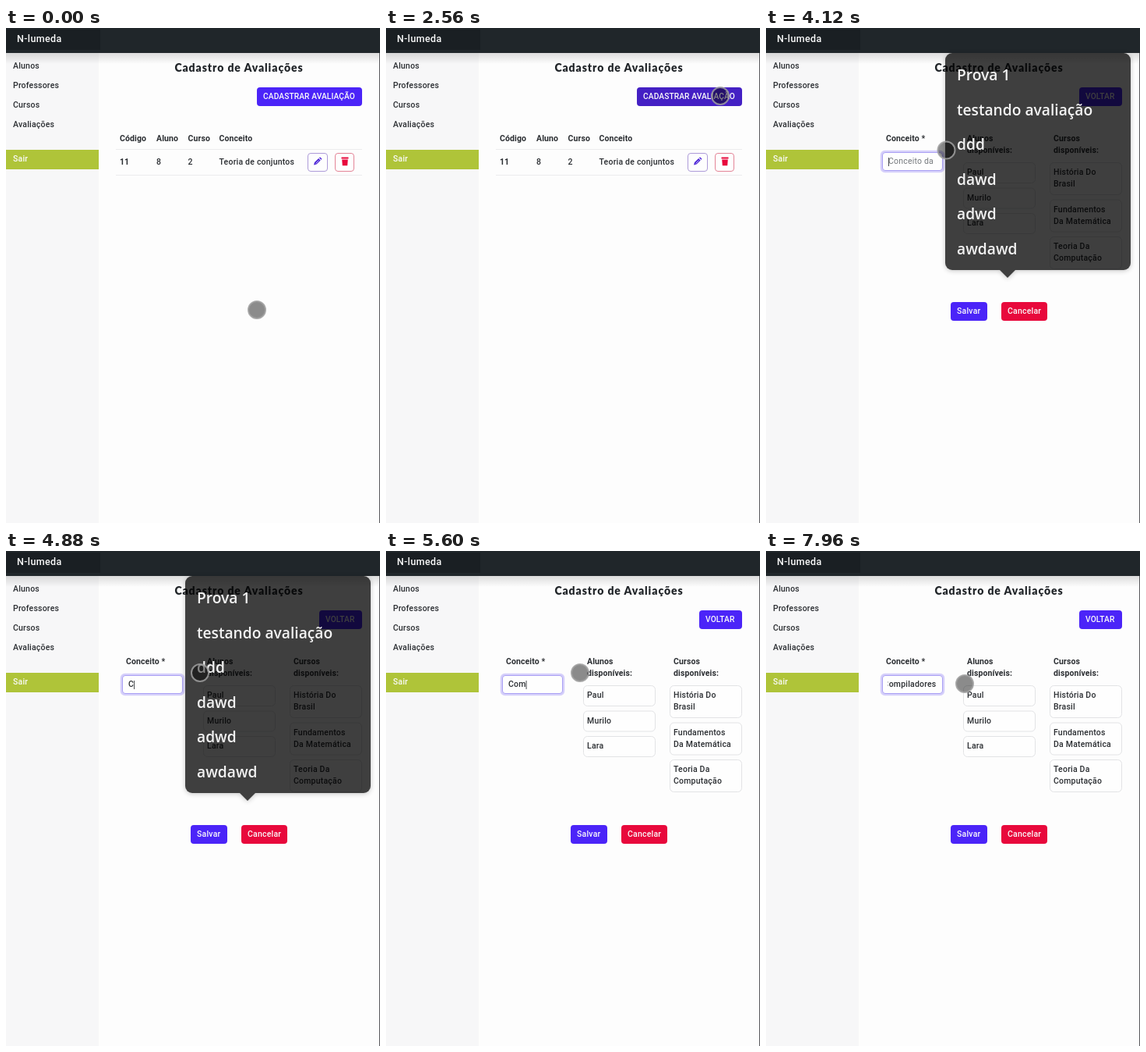
Write an HTML page that moves like this. It is 480 px wide and 634 px high and loops after 8 s.

```html
<!DOCTYPE html>
<html lang="pt-BR">
<head>
<meta charset="utf-8">
<title>Cadastro de Avaliações</title>
<style>
html, body { margin: 0; width: 100%; height: 100%; overflow: hidden; background: #fdfdfd; }
svg { display: block; width: 100%; height: 100%; }
text { font: 500 10.5px Roboto, sans-serif; letter-spacing: .2px; fill: #2b2e32; white-space: pre; }
.bold { font-weight: 700; letter-spacing: .1px; }
.light { fill: #fafafa; }
.brand { font-size: 12.5px; letter-spacing: .4px; }
.title { font: 900 14px Lato, sans-serif; letter-spacing: .9px; fill: #212529; }
.upper { font-size: 10.2px; letter-spacing: .1px; }
.hint { fill: #74787c; font-weight: 400; }
.box { fill: #fefefe; stroke: #e2e3e5; }
.rule { stroke: #ececee; }
.primary { fill: #4b24f8; }
.primary.hover { fill: #4420c4; }
.danger { fill: #e8093c; }
#popup text { font: 600 19.2px "Open Sans", sans-serif; letter-spacing: 0; fill: #f2f2f2; }
</style>
</head>
<body>
<svg viewBox="0 0 480 634" preserveAspectRatio="none">
  <defs>
    <linearGradient id="shade" x2="0" y2="1">
      <stop stop-opacity=".13"/>
      <stop offset="1" stop-opacity="0"/>
    </linearGradient>
    <filter id="glow" x="-10%" y="-10%" width="120%" height="120%">
      <feDropShadow dx="0" dy="1" stdDeviation="3" flood-opacity=".3"/>
    </filter>
    <clipPath id="field"><rect x="156.500" y="160" width="62.500" height="22"/></clipPath>
  </defs>

  <rect width="480" height="634" fill="#fdfdfd"/>
  <rect y="32" width="119" height="602" fill="#f7f7f8"/>
  <rect y="32" width="480" height="14" fill="url(#shade)"/>
  <rect width="480" height="32" fill="#20262a"/>
  <rect y="2" width="121" height="26" fill="#1a1f23"/>
  <path d="M479.500 32V634" stroke="#58585c"/>
  <text class="brand light" x="14" y="18">N-lumeda</text>
  <g id="menu"></g>
  <rect y="156" width="119" height="25" fill="#afc439"/>
  <text class="light" x="9" y="171">Sair</text>
  <text class="title" x="299" y="56" text-anchor="middle">Cadastro de Avaliações</text>

  <g id="list">
    <path class="rule" d="M141 155.500H457M141 188.500H457"/>
    <rect x="387.500" y="160.500" width="25" height="23" rx="3.500" fill="#fefefe" stroke="#ad9bd8"/>
    <path d="M395 175.500l1-3.400 5.200-5.200 2.500 2.500-5.200 5.200zM402 166.200l1-1 2.500 2.500-1 1z" fill="#4b24d8"/>
    <path d="M397.500 173.500l4-4" stroke="#fefefe" stroke-width=".7"/>
    <rect x="422.500" y="160.500" width="24" height="23" rx="3.500" fill="#fefefe" stroke="#e48497"/>
    <path d="M430.500 165.500h9v2h-9zM431.200 168.500h7.600l-.6 7.800h-6.400z" class="danger"/>
  </g>

  <g id="form">
    <rect id="ring" x="148.500" y="158.500" width="79" height="25" rx="4" fill="none" stroke="#d6d0fa" stroke-width="3.500"/>
    <rect id="input" class="box" x="149.500" y="159.500" width="77" height="23" rx="3.500"/>
    <g clip-path="url(#field)">
      <text id="hint" class="hint" x="157" y="174">Conceito da</text>
      <text id="typed" y="174"></text>
      <path id="caret" d="M.500 166V177" stroke="#33363a" stroke-width=".9"/>
    </g>
    <g id="options"></g>
    <g id="actions"></g>
  </g>

  <g id="popup">
    <g filter="url(#glow)" opacity=".75">
      <rect x="230" y="32" width="238" height="278" rx="9"/>
      <path d="M300 310h20l-10 10z"/>
    </g>
  </g>

  <circle id="pointer" r="11" fill-opacity=".45" stroke="#a0a0a0" stroke-opacity=".85" stroke-width="2"/>
</svg>
<script>
const LOOP = 8000, STEP = 40;
const FORM_AT = 2720, LOADED_AT = 2880, FOCUS_AT = 3760, BLUR_AT = 7280;
const WORD = 'Compiladores';

const el = id => document.getElementById(id);
const show = (id, on) => el(id).style.display = on ? '' : 'none';
const ramp = (t, from, to) => Math.min(1, Math.max(0, (t - from) / (to - from)));
const smooth = k => k * k * (3 - 2 * k);

function add(tag, parent, attrs, content = '') {
  const node = document.createElementNS('http://www.w3.org/2000/svg', tag);
  for (const key in attrs) node.setAttribute(key, attrs[key]);
  node.textContent = content;
  return el(parent).appendChild(node);
}

const label = (parent, x, y, content, kind = '') => add('text', parent, { x, y, class: kind }, content);

function button(parent, x, y, width, content, kind, textKind = '') {
  const face = add('rect', parent, { x, y, width, height: 24, rx: 4, class: kind });
  label(parent, x + 8, y + 15, content, 'light ' + textKind);
  return face;
}

// Stacks option boxes; a two-line option is one line taller.
function optionColumn(x, options) {
  let y = 172.5;
  for (const lines of options) {
    const height = 11 + 15 * lines.length;
    add('rect', 'options', { class: 'box', x: x + .5, y, width: 92, height, rx: 5 });
    lines.forEach((line, i) => label('options', x + 5, y + 15.5 + 15 * i, line));
    y += height + 6.5;
  }
}

['Alunos', 'Professores', 'Cursos', 'Avaliações'].forEach((name, i) => label('menu', 9, 52 + 25 * i, name));

const addButton = button('list', 322, 76, 135, 'CADASTRAR AVALIAÇÃO', 'primary', 'upper');
[[146, 'Código', '11'], [193, 'Aluno', '8'], [233.5, 'Curso', '2'], [273.5, 'Conceito', 'Teoria de conjuntos']]
  .forEach(([x, head, value], i) => {
    label('list', x, 145, head, 'bold');
    label('list', x, 175, value, i ? '' : 'bold');
  });

button('form', 402, 76, 55, 'VOLTAR', 'primary', 'upper');
label('form', 154, 145, 'Conceito *', 'bold');
[[258, 'Alunos'], [369, 'Cursos']].forEach(([x, name]) => {
  label('form', x, 145, name, 'bold');
  label('form', x, 160, 'disponíveis:', 'bold');
});
optionColumn(253, [['Paul'], ['Murilo'], ['Lara']]);
optionColumn(364, [['História Do', 'Brasil'], ['Fundamentos', 'Da Matemática'], ['Teoria Da', 'Computação']]);
button('actions', 237, 351, 47, 'Salvar', 'primary');
button('actions', 302, 351, 59, 'Cancelar', 'danger');

['Prova 1', 'testando avaliação', 'ddd', 'dawd', 'adwd', 'awdawd']
  .forEach((name, i) => label('popup', 245, 67 + 44.6 * i, name));

const spot = {
  start: [322, 361], menu: [40, 150], corner: [456, 45], create: [429, 87],
  field: [214, 157], beside: [249, 156], options: [272, 228], end: [255, 170]
};
const route = [
  [0, spot.start], [400, spot.menu], [840, spot.create], [1080, spot.menu], [1320, spot.corner],
  [1800, spot.create], [2000, spot.create], [2240, spot.menu], [2560, spot.create], [2840, spot.create],
  [3560, spot.field], [3760, spot.field], [4480, spot.beside], [7760, spot.beside],
  [7880, spot.options], [7960, spot.end], [LOOP, spot.end]
];

function pointerAt(t) {
  const next = route.findIndex(([time]) => time > t);
  const [t0, [x0, y0]] = route[next - 1], [t1, [x1, y1]] = route[next];
  const k = smooth(ramp(t, t0, t1));
  return [x0 + (x1 - x0) * k, y0 + (y1 - y0) * k];
}

// The first key comes alone, the rest at an even pace.
function typedCount(t) {
  if (t < 4800) return 0;
  return 1 + Math.max(0, 1 + Math.floor((t - 5240) / 190));
}

function drawInput(t) {
  const focused = t >= FOCUS_AT;
  const value = WORD.slice(0, typedCount(t));
  show('ring', focused);
  el('input').style.stroke = focused ? '#aaa0f4' : '';
  show('hint', !value);
  el('typed').textContent = value;
  const width = value ? el('typed').getComputedTextLength() : 0;
  const left = Math.min(157, 218.5 - width);
  el('typed').setAttribute('x', left);
  show('caret', focused && t < BLUR_AT);
  el('caret').setAttribute('transform', `translate(${Math.min(218, left + width)} 0)`);
}

function draw(t) {
  const [x, y] = pointerAt(t);
  el('pointer').setAttribute('transform', `translate(${x} ${y})`);
  show('list', t < FORM_AT);
  show('form', t >= FORM_AT);
  addButton.classList.toggle('hover', x > 322 && x < 457 && y > 76 && y < 100);
  show('options', t >= LOADED_AT);
  el('actions').setAttribute('transform', `translate(0 ${t < LOADED_AT ? -123 : 0})`);
  drawInput(t);
  const opacity = ramp(t, 3800, 4000) * (1 - ramp(t, 4880, 5240));
  el('popup').style.opacity = opacity;
  show('popup', opacity > 0);
}

const start = performance.now();
function tick() {
  const t = (performance.now() - start) % LOOP;
  draw(Math.floor(t / STEP) * STEP);
  requestAnimationFrame(tick);
}
tick();
</script>
</body>
</html>
```
